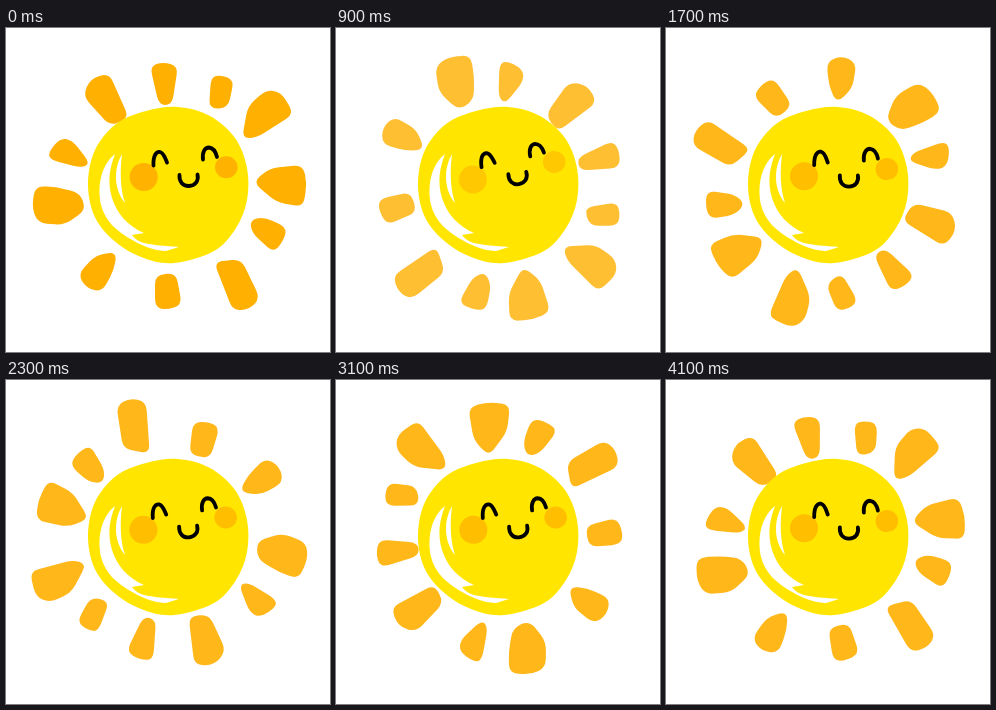
Write an HTML page with a canvas that moves like this. It is 324 by 324 pixels and loops after 4200 ms.

```html
<!DOCTYPE html>
<html lang="en">
<head>
<meta charset="utf-8">
<title>Smiling sun</title>
<style>
html, body { margin: 0; width: 100%; height: 100%; overflow: hidden; background: #fff; }
canvas { display: block; width: 100vw; height: 100vh; }
</style>
</head>
<body>
<canvas id="stage"></canvas>
<script>
const SIZE = 324, LOOP = 4200, STEP = 100, SWAY = 1200;
const PIVOT = [163.8, 158.7];
const ORANGE = '#ffb000', YELLOW = '#ffe500';

// Ray corners, clockwise, as x y pairs.
const RAYS = [
  [77,68, 84,51, 103,45, 123,90, 104,98],
  [144,38, 157,34, 172,38, 166,77, 153,77],
  [205,49, 215,47, 228,52, 222,80, 203,81],
  [236,110, 242,78, 260,62, 275,64, 288,86, 250,110],
  [247,154, 264,140, 297,137, 301,156, 297,179, 270,174],
  [244,192, 258,189, 280,199, 279,210, 268,225, 246,205],
  [208,234, 235,231, 254,270, 244,281, 227,283],
  [149,247, 170,245, 176,277, 160,282, 149,279],
  [72,246, 90,227, 111,224, 108,242, 96,264, 80,260],
  [26,180, 29,158, 50,159, 74,165, 80,182, 58,197, 32,195],
  [42,125, 54,110, 66,112, 84,135, 76,140, 45,132]
].map(toPoints);

const DISC = toPoints([172,79, 204,88, 229,110, 241,140, 241,172, 230,200, 208,223, 168,235,
  135,229, 106,211, 88,187, 82,155, 89,122, 110,96, 140,83]);

const SHINE = [
  'M109 126C95 137 91 158 95 177C99 193 111 204 128 213C138 219 151 223 160 223L173 219' +
    'C158 218 147 217 138 215Q129 212 126 207L138 205C122 198 111 186 106 170C101 153 104 139 109 126Z',
  'M116 126C108 140 107 160 119 175C114 160 114 143 116 126Z'
].map(d => new Path2D(d));

const FEATURES = [
  'M147.5 137.5C147 128 150 123.5 154 124C158 125 159 130 161 134.5',
  'M197 131.5C196 124 199 119.5 203 119.5C208 120 210 125 211 129',
  'M173.5 147C173 154 177 158.3 183 158C189 157.7 193 153 191.5 146.5'
].map(d => new Path2D(d));

const canvas = document.getElementById('stage');
const ctx = canvas.getContext('2d');

function toPoints(list) {
  const points = [];
  for (let i = 0; i < list.length; i += 2) points.push([list[i], list[i + 1]]);
  return points;
}

function toward([x, y], [x2, y2], reach) {
  const k = Math.min(0.5, reach / Math.hypot(x2 - x, y2 - y));
  return [x + (x2 - x) * k, y + (y2 - y) * k];
}

function fillRounded(points, reach) {
  const n = points.length;
  ctx.beginPath();
  points.forEach((p, i) => {
    ctx.lineTo(...toward(p, points[(i + n - 1) % n], reach));
    ctx.quadraticCurveTo(...p, ...toward(p, points[(i + 1) % n], reach));
  });
  ctx.fill();
}

// Closed Catmull-Rom curve through every point.
function fillSmooth(points) {
  const n = points.length, at = i => points[(i + n) % n];
  ctx.beginPath();
  ctx.moveTo(...points[0]);
  for (let i = 0; i < n; i++) {
    const [a, b, c, d] = [at(i - 1), at(i), at(i + 1), at(i + 2)];
    ctx.bezierCurveTo(b[0] + (c[0] - a[0]) / 6, b[1] + (c[1] - a[1]) / 6,
      c[0] - (d[0] - b[0]) / 6, c[1] - (d[1] - b[1]) / 6, ...c);
  }
  ctx.fill();
}

function fillEllipse(x, y, rx, ry) {
  ctx.beginPath();
  ctx.ellipse(x, y, rx, ry, 0, 0, Math.PI * 2);
  ctx.fill();
}

function turned(angle, draw) {
  ctx.save();
  ctx.translate(...PIVOT);
  ctx.rotate(angle);
  ctx.translate(-PIVOT[0], -PIVOT[1]);
  draw();
  ctx.restore();
}

function drawSun(time) {
  const phase = time / SWAY * Math.PI * 2;
  const sway = Math.asin(Math.sin(phase)) * 2 / Math.PI;
  const fade = Math.abs(Math.sin(phase));

  ctx.fillStyle = '#fff';
  ctx.fillRect(0, 0, SIZE, SIZE);

  turned(time / LOOP * Math.PI * 2, () => {
    ctx.globalAlpha = 1 - 0.2 * fade;
    ctx.fillStyle = ORANGE;
    RAYS.forEach(ray => fillRounded(ray, 9));
  });

  ctx.fillStyle = YELLOW;
  fillSmooth(DISC);
  ctx.fillStyle = '#fff';
  SHINE.forEach(path => ctx.fill(path));

  turned(sway * 5.5 * Math.PI / 180, () => {
    ctx.globalAlpha = 0.95 - 0.4 * fade;
    ctx.fillStyle = ORANGE;
    fillEllipse(137.7, 149, 14, 14);
    fillEllipse(220.3, 139.3, 11.3, 11);
    ctx.globalAlpha = 1;
    ctx.strokeStyle = '#000';
    ctx.lineWidth = 3.8;
    ctx.lineCap = 'round';
    FEATURES.forEach(path => ctx.stroke(path));
  });
}

function resize() {
  const ratio = window.devicePixelRatio || 1;
  canvas.width = Math.round(innerWidth * ratio);
  canvas.height = Math.round(innerHeight * ratio);
}

function frame() {
  const time = Math.floor(performance.now() % LOOP / STEP) * STEP;
  ctx.setTransform(canvas.width / SIZE, 0, 0, canvas.height / SIZE, 0, 0);
  drawSun(time);
  requestAnimationFrame(frame);
}

addEventListener('resize', resize);
resize();
frame();
</script>
</body>
</html>
```
